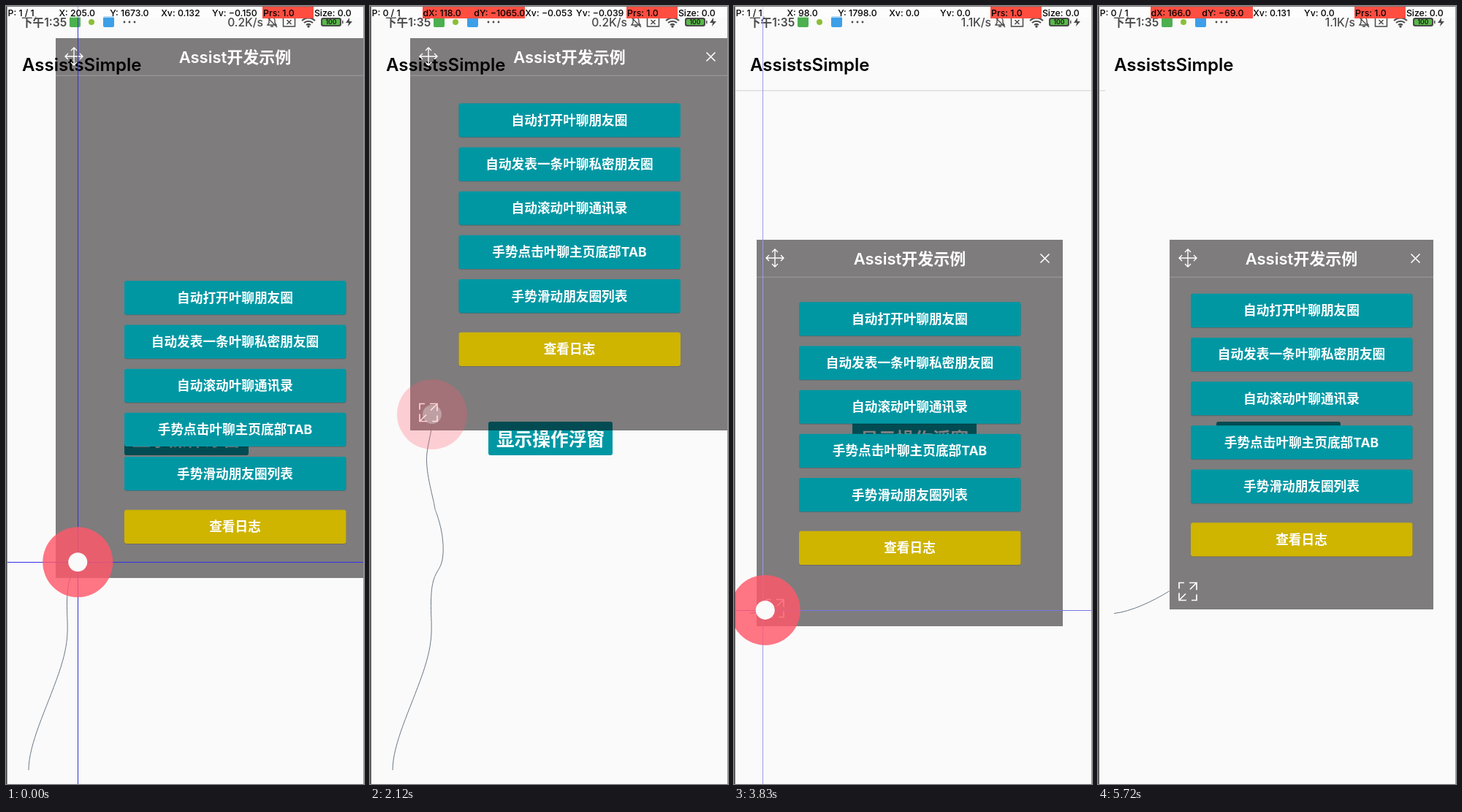
Write an HTML page with a canvas that moves like this. It is 490 px wide and 1065 px high and loops after 5.74 s.

```html
<!DOCTYPE html>
<html lang="zh">
<head>
<meta charset="utf-8">
<title>Assist</title>
<style>
  html, body { margin: 0; width: 100%; height: 100%; overflow: hidden; background: #fafafa; }
  canvas { display: block; }
</style>
</head>
<body>
<canvas id="stage" width="490" height="1065"></canvas>
<script>
const g = document.getElementById('stage').getContext('2d');
const W = 490, H = 1065, LOOP = 5740, STEP = 211.85;
const LAG = .08; // the panel and crosshair trail the finger by this part of a step
const TEAL = '#0097a3', YELLOW = '#cfb400', FONT = 'Inter, "Noto Sans CJK SC", "Noto Sans CJK", sans-serif';

const clamp = v => Math.min(1, Math.max(0, v));
const ease = u => u * u * (3 - 2 * u);

// Times are in steps. The finger eases along `path` from the fraction `head` to its end.
// readings: [step, X, Y, Xv, Yv]; panel: [left, top, width, height, extra layout height].
const TOUCHES = [
  {
    from: 0, to: 7.9, up: 9, head: .59,
    path: 'M31 1046C31 1010 55 963 72 914S83 850 83.5 815S92 777 97 765S101 728 95 707S90 695 88 683S75 635 78 612S85 585 85 559',
    readings: [[-8, 62, 2292, 0, 0], [0, 205, 1673, .132, -.15], [6, 178, 1300, .274, -.731], [8, 180, 1227, -.053, -.039]],
    panel: (p, u) => [p.x - 30.5, 44, 436 + 55 * (1 - u) ** 4, p.y - 22, 284 * (1 - u) ** .82],
    cross: e => [`rgba(50,50,220,${1 - e})`, `rgba(50,50,230,${1 - e / 2})`]
  }, {
    from: 11, to: 14.5, up: 14.3, head: 0,
    path: 'M78 63C80 120 74 160 52 194C42 208 38 225 33 250S12 290 12 320',
    readings: [[11, 166, 130, 0, 0], [13, 85, 463, -.516, .852], [15, 21, 692, .013, .378]],
    panel: p => [p.x, p.y, 436, 537, 0],
    cross: () => ['#858585', 'transparent']
  }, {
    from: 17, to: 20, up: 24.5, head: 0,
    path: 'M22 831.5C45 829 75 815 97.5 801',
    readings: [[17, 43, 1820, 0, 0], [20, 209, 1755, 0, 0], [24, 209, 1755, 0, 0], [25, 209, 1751, .131, 0]],
    panel: (p, u) => [12 + 86 * ease(u), 320, 436 - 75 * ease(u), 536 - 30 * ease(u), 0],
    cross: () => ['#9a9aee', '#7777e8']
  }
];

for (const touch of TOUCHES) {
  touch.curve = document.createElementNS('http://www.w3.org/2000/svg', 'path');
  touch.curve.setAttribute('d', touch.path);
  touch.length = touch.curve.getTotalLength();
}

const progress = (touch, step) => clamp((step - touch.from) / (touch.to - touch.from));
const travelled = (touch, u) => touch.length * (touch.head + (1 - touch.head) * ease(u));
const pointAt = (touch, u) => touch.curve.getPointAtLength(travelled(touch, u));

function readingAt(readings, step) {
  const i = readings.findIndex(r => r[0] > step);
  if (i < 0) return readings.at(-1).slice(1);
  const a = readings[i - 1], b = readings[i], u = (step - a[0]) / (b[0] - a[0]);
  return a.slice(1).map((v, j) => v + (b[j + 1] - v) * u);
}

function rect(x, y, w, h, color) {
  g.fillStyle = color;
  g.fillRect(x, y, w, h);
}

function box(x, y, w, h, r, color) {
  g.fillStyle = color;
  g.beginPath();
  g.roundRect(x, y, w, h, r);
  g.fill();
}

function disc(x, y, r, color) {
  g.fillStyle = color;
  g.beginPath();
  g.arc(x, y, r, 0, 7);
  g.fill();
}

function text(str, x, y, size, weight, color, align = 'left') {
  g.font = `${weight} ${size}px ${FONT}`;
  g.fillStyle = color;
  g.textAlign = align;
  g.fillText(str, x, y + size * .37);
}

function strokePath(d, x, y, color, width, dash = []) {
  g.save();
  g.translate(x, y);
  g.strokeStyle = color;
  g.lineWidth = width;
  g.setLineDash(dash);
  g.stroke(new Path2D(d));
  g.restore();
}

function drawPage(step) {
  rect(0, 0, W, H, '#fafafa');
  text('AssistsSimple', 22, 80, 24, 600, '#000');
  if (step >= 12) rect(2, 115, step < 27 ? 487 : 8, 1.5, '#dedede');
  box(162, 569, 170, 46, 3, TEAL);
  text('显示操作浮窗', 247, 592.5, 24.7, 700, '#fff', 'center');
}

function drawButton(label, cx, y, color) {
  box(cx - 151.5, y + .5, 303.5, 46.5, 3, 'rgba(0,0,0,.2)');
  box(cx - 151.5, y, 303.5, 46.2, 3, color);
  text(label, cx, y + 23, 17.65, 700, '#fff', 'center');
}

function drawPanel(touch, step) {
  const u = progress(touch, step - LAG);
  const [left, top, width, height, extra] = touch.panel(pointAt(touch, u), u).map(Math.round);
  const cx = left + width / 2, layout = height + extra, first = top + (layout - 358.5) / 2;
  g.save();
  g.beginPath();
  g.rect(left, top, Math.min(width, 489 - left), height);
  g.clip();
  rect(left, top, width, height, 'rgba(4,0,2,.5)');
  rect(left, top + 50.5, width, 1.5, 'rgba(255,255,255,.17)');
  text('Assist开发示例', cx, top + 26, 22, 600, '#fff', 'center');
  strokePath('M-12 0H12M0-12V12M-8-4L-12 0L-8 4M8-4L12 0L8 4M-4-8L0-12L4-8M-4 8L0 12L4 8',
    left + 25, top + 25, '#fff', 1.4);
  strokePath('M-6-6L6 6M6-6L-6 6', left + width - 24.5, top + 25.5, '#fff', 1.6);
  strokePath('M-12-4V-12H-5M5 12H12V4M2-12H12V-2M12-12L3-3M-2 12H-12V2M-12 12L-3 3',
    left + 25, top + layout - 24.5, '#fff', 1.7);
  ['自动打开叶聊朋友圈', '自动发表一条叶聊私密朋友圈', '自动滚动叶聊通讯录', '手势点击叶聊主页底部TAB', '手势滑动朋友圈列表']
    .forEach((label, i) => drawButton(label, cx, first + i * 60.2, TEAL));
  drawButton('查看日志', cx, first + 313.5, YELLOW);
  g.restore();
}

function drawStatusBar(step) {
  const ink = '#4a4a4a';
  text('下午1:35', 21, 22, 15.6, 600, ink);
  box(87, 14, 15, 15, 2, '#4caf50');
  disc(117, 22, 4, '#8cbf35');
  box(133, 14, 15, 15, 2, '#3d9fe8');
  [162, 169, 176].forEach(x => disc(x, 22, 1.4, ink));
  text(step < 12 ? '0.2K/s' : '1.1K/s', 352, 22, 15.6, 500, ink, 'right');
  strokePath('M-6 4H6L4 1V-2A4 4 0 0 0-4-2V1ZM-2 6H2M-7-7L7 7', 364, 22, ink, 1.4);
  strokePath('M-8-6H8V6H-8ZM-3-3L3 3M3-3L-3 3', 387.5, 22, ink, 1.5);
  strokePath('M-9-2A13 13 0 0 1 9-2M-6 1A9 9 0 0 1 6 1M-3 4A5 5 0 0 1 3 4', 414, 22, ink, 2);
  disc(414, 28, 1.7, ink);
  box(431, 16, 28, 12, 3, ink);
  box(433, 18, 24, 8, 2, '#58b947');
  rect(460, 20, 1.5, 4, ink);
  text('100', 445, 22, 8.5, 700, '#222', 'center');
  g.fillStyle = ink;
  g.fill(new Path2D('M470 16L465 23H469L468 28L474 21H470Z'));
}

function drawCrosshair({ x, y }, [vertical, horizontal]) {
  strokePath(`M${Math.floor(x) + .5} 1V${H}`, 0, 0, vertical, 1);
  strokePath(`M2 ${Math.floor(y) + .5}H489`, 0, 0, horizontal, 1);
}

function drawFinger({ x, y }, opacity) {
  g.globalAlpha = opacity;
  disc(x, y, 48, 'rgba(255,88,107,.82)');
  disc(x, y, 13, '#fafafa');
  g.globalAlpha = 1;
}

function drawReadout(touch, step, down) {
  const signed = s => s.replace('-', '−');
  const speed = v => Math.abs(v) < .0005 ? '0.0' : signed(v.toFixed(3));
  const place = v => signed(v.toFixed(0)) + '.0';
  const [, startX, startY] = touch.readings[0];
  const [x, y, xv, yv] = readingAt(touch.readings, step);
  const red = '#ff4d40';
  const position = down ? [`X: ${place(x)}`, `Y: ${place(y)}`] : [`dX: ${place(x - startX)}`, `dY: ${place(y - startY)}`];
  rect(2, 1, 487, 15, 'rgba(255,255,255,.6)');
  if (!down) rect(72, 1, 140, 16, red);
  rect(351, 1, 70, 16, red);
  [`P: ${+down} / 1`, ...position, `Xv: ${speed(xv)}`, `Yv: ${speed(yv)}`, 'Prs: 1.0', 'Size: 0.0']
    .forEach((s, i) => text(s, 2.5 + i * 69.9, 9, 12.3, 500, '#000'));
}

function drawPointer(touch, step) {
  const u = progress(touch, step), down = step <= touch.up;
  strokePath(touch.path, 0, 0, '#6c7885', 1, [travelled(touch, u), touch.length]);
  if (down) drawCrosshair(pointAt(touch, progress(touch, step - LAG)), touch.cross(ease(u)));
  drawFinger(pointAt(touch, u), clamp(1 - (step - touch.up) / 1.5));
  drawReadout(touch, step, down);
}

function frame(now) {
  const step = Math.floor(now % LOOP / STEP);
  const touch = TOUCHES.findLast(t => t.from <= step);
  drawPage(step);
  drawPanel(touch, step);
  drawStatusBar(step);
  drawPointer(touch, step);
  rect(0, 0, 1.6, H, '#444');
  rect(0, 0, W, 1, '#777');
  rect(489, 0, 1, H, '#999');
  requestAnimationFrame(() => frame(performance.now() - start));
}

const start = performance.now();
frame(0);
</script>
</body>
</html>
```
